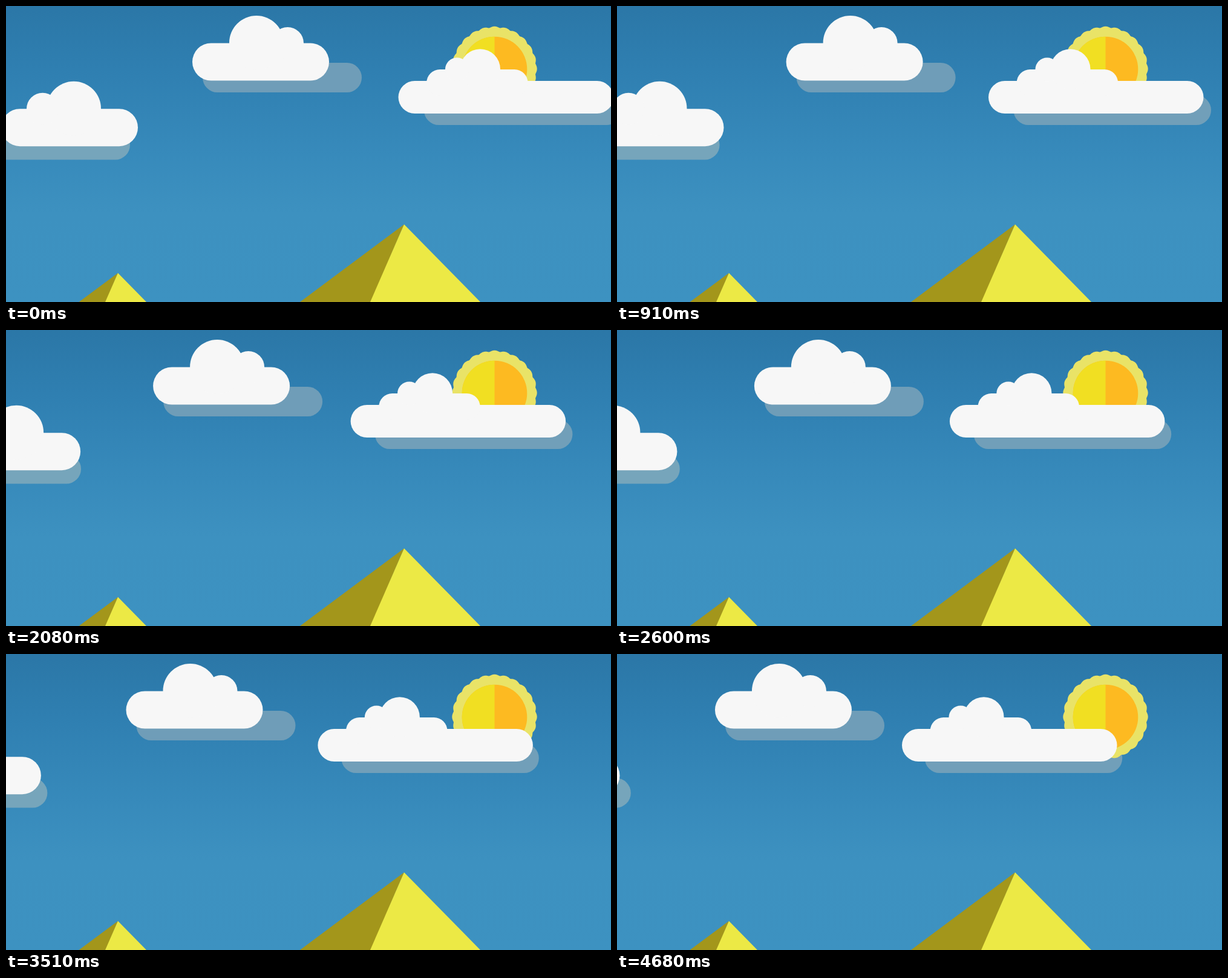
An HTML page for the animation above (4.81 s loop, 1000 px wide and 490 px high).

```html
<!DOCTYPE html>
<html lang="en">
<head>
<meta charset="utf-8">
<title>Clouds over pyramids</title>
<style>
html, body { margin: 0; width: 100%; height: 100%; overflow: hidden; background: #378abc; }
svg { display: block; width: 100%; height: 100%; }
</style>
</head>
<body>
<svg viewBox="0 0 1000 490">
  <defs>
    <linearGradient id="sky" x1="0" y1="0" x2="0" y2="1">
      <stop offset="0" stop-color="#2b77a7"/>
      <stop offset=".215" stop-color="#2f7fb1"/>
      <stop offset=".5" stop-color="#378abb"/>
      <stop offset=".7" stop-color="#3d91c0"/>
      <stop offset="1" stop-color="#3d92c1"/>
    </linearGradient>
    <g id="puff" fill="#f7f7f7">
      <rect y="61.5" width="226" height="62" rx="31"/>
      <circle cx="106" cy="61" r="45"/>
      <circle cx="157.5" cy="61.5" r="26.5"/>
    </g>
  </defs>
  <rect width="1000" height="490" fill="url(#sky)"/>

  <g fill="#a3961b">
    <path d="M658 361.5 486 490H603Z"/>
    <path d="M185 442 120.5 490H165Z"/>
  </g>
  <g fill="#ece945">
    <path d="M658 361.5 602 490H784Z"/>
    <path d="M185 442 164 490H232Z"/>
  </g>

  <rect id="shadeL" y="205.5" width="263" height="49" rx="24.5" fill="#76a5bb"/>
  <rect id="shadeM" y="94" width="263" height="49" rx="24.5" fill="#6f9db8"/>
  <rect id="shadeR" y="148" width="326.5" height="49" rx="24.5" fill="#719fb9"/>

  <g transform="translate(807.5 104)">
    <path id="rim" fill="#e9e367"/>
    <circle cy=".5" r="53.8" fill="#fdba21"/>
    <path d="M0-53.3A53.8 53.8 0 0 0 0 54.3Z" fill="#f1df22"/>
  </g>

  <g id="cloudL"><use href="#puff" transform="translate(226 108.7) scale(-1 1)"/></g>
  <g id="cloudM"><use href="#puff"/></g>
  <g id="cloudR" fill="#f7f7f7">
    <rect y="124" width="355.5" height="54" rx="27"/>
    <rect x="46.7" y="105" width="167.3" height="44" rx="22"/>
    <circle cx="135.3" cy="104.5" r="33.2"/>
    <circle cx="97" cy="105" r="19.6"/>
  </g>
</svg>
<script>
const STEP = 130, STEPS = 37;
const $ = id => document.getElementById(id);

// start x and drift to the left per step
const drifters = [
  ["shadeL", -58, 5.06],
  ["shadeM", 325, 4.056],
  ["shadeR", 690.9, 5.06],
  ["cloudL", -8, 5.93],
  ["cloudM", 308, 4.056],
  ["cloudR", 648.5, 4.93]
].map(([id, x, speed]) => ({ el: $(id), x, speed }));

function scallops(count, base, depth) {
  const pts = [];
  for (let i = 0; i < 360; i++) {
    const a = i * Math.PI / 180;
    const r = base + depth * Math.abs(Math.cos(a * count / 2));
    pts.push((r * Math.sin(a)).toFixed(2) + " " + (-r * Math.cos(a)).toFixed(2));
  }
  return "M" + pts.join("L") + "Z";
}
$("rim").setAttribute("d", scallops(24, 68, 2.2));

function draw(ms) {
  const n = Math.floor(ms / STEP) % STEPS;
  for (const { el, x, speed } of drifters)
    el.setAttribute("transform", `translate(${(x - speed * n).toFixed(2)} 0)`);
}

let start;
function tick(now) {
  start ??= now;
  draw(Math.max(0, now - start));
  requestAnimationFrame(tick);
}
draw(0);
requestAnimationFrame(tick);
</script>
</body>
</html>
```
